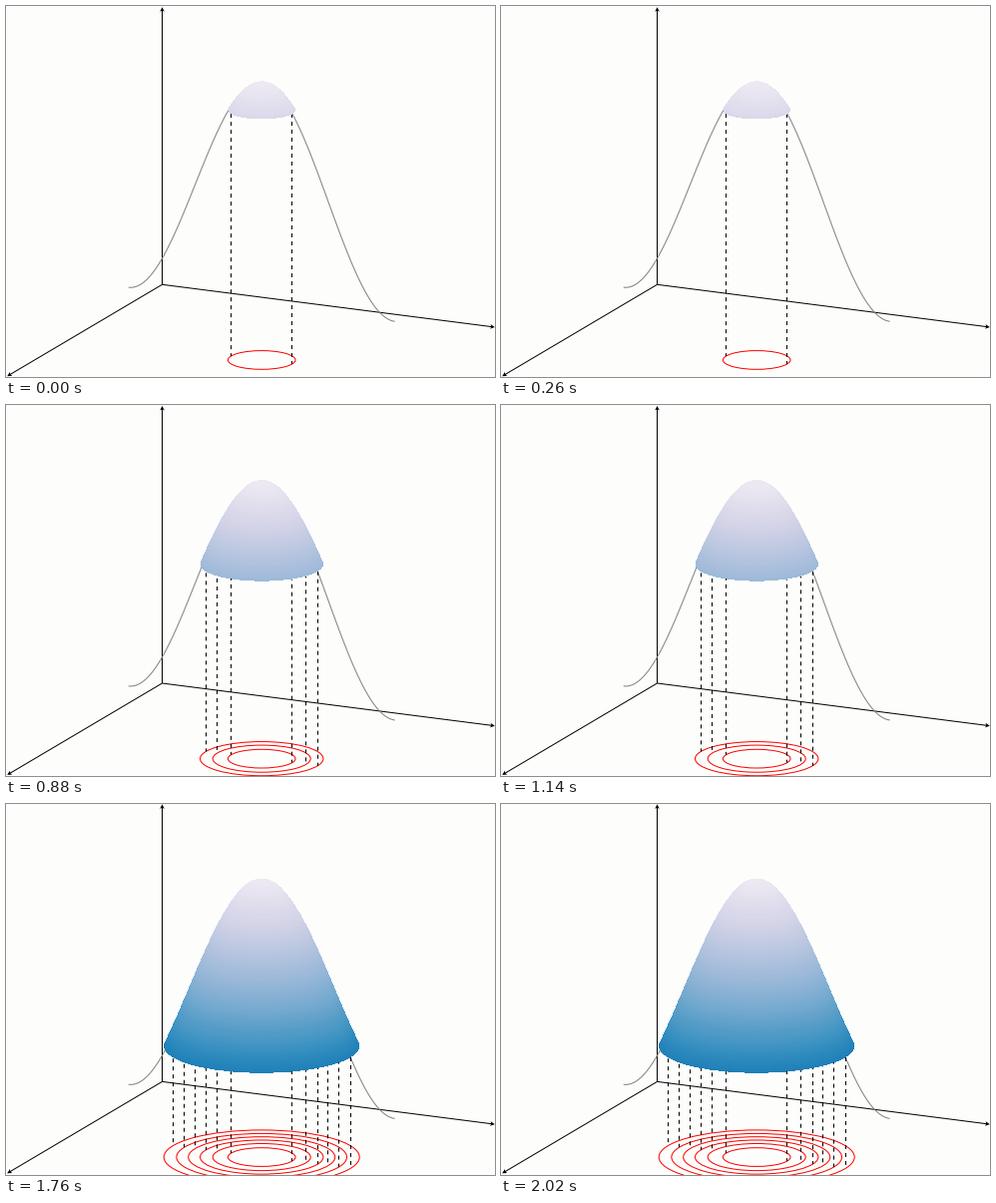
A matplotlib script for the animation above (2.2 s loop, 490 by 372 pixels).

```python
import numpy as np
import matplotlib.pyplot as plt
from matplotlib.animation import FuncAnimation
from matplotlib.patches import Ellipse, Polygon

W, H, DPI = 490, 372, 100
PX = 72 / DPI                      # one pixel in points
BG = "#fdfefc"

CX, BASE, HEIGHT = 256.2, 299.2, 223.0
FLOOR = BASE + HEIGHT / 4
R0 = 147.0                         # radius where the bump reaches zero
TILT = 0.277                       # flattening of horizontal circles
SLOPE = 0.128                      # screen slope of the right-hand axis
STRETCH = np.hypot(1, SLOPE / TILT)

SLICES = (1, 2, 3, 5, 6)           # level reached at each step, in eighths
SHIFT = (0, 0, 0.3, 0.7, 0.9)      # small upward drift of the view

fig = plt.figure(figsize=(W / DPI, H / DPI), dpi=DPI, facecolor=BG)
ax = fig.add_axes([0, 0, 1, 1])
cmap = plt.get_cmap("PuBu")


def radius(z):
    return R0 / np.pi * np.arccos(2 * z - 1)


def height(r):
    return (1 + np.cos(np.pi * r / R0)) / 2


def screen_y(z):
    return BASE - HEIGHT * z


def line(xs, ys, color="black", **kw):
    ax.plot(xs, ys, color=color, lw=PX, snap=False,
            solid_capstyle="butt", **kw)


def arrow(start, tip):
    start, tip = np.array(start), np.array(tip)
    d = (tip - start) / np.linalg.norm(tip - start)
    n = np.array([-d[1], d[0]])
    line(*zip(start, tip - 2 * d), zorder=1)
    back = tip - 4.5 * d
    ax.add_patch(Polygon([tip, back + 2.3 * n, tip - 3.5 * d, back - 2.3 * n],
                         fc="black", lw=0, zorder=1))


def draw_axes():
    origin = (156.5, 279.3)
    for tip in ((156.5, 1.2), (489.8, 322.0), (1.2, 371.2)):
        arrow(origin, tip)


def draw_profile(low):
    """Cross-section of the bump, only below the cap's rim."""
    r = np.linspace(radius(low), R0, 60)
    for u in (-r / STRETCH, r / STRETCH):
        line(CX + u, screen_y(height(r)) + SLOPE * u, "#808080", zorder=2)


def draw_level(z):
    r = radius(z)
    ax.add_patch(Ellipse((CX, FLOOR), 2 * r, 2 * r * TILT, fill=False,
                         ec="red", lw=PX, zorder=3))
    for u in (-r / STRETCH, r / STRETCH):
        x = np.floor(CX + u) + 0.5
        dy = SLOPE * u
        line([x, x], [screen_y(z) + dy, FLOOR + dy], dashes=(4, 4), zorder=4)


def draw_cap(low):
    # hard-edged fills grow by about half a pixel, so shrink them first
    for z in np.linspace(low, 0.9995, 150):
        w = 2 * radius(z)
        ax.add_patch(Ellipse((CX, screen_y(z)), w - 1, max(w * TILT - 1, 0.5),
                             fc=cmap(0.115 + 0.76 * (1 - z)), lw=0,
                             antialiased=False, zorder=5))


def update(i):
    ax.clear()
    ax.axis("off")
    ax.set_xlim(0, W)
    ax.set_ylim(H + SHIFT[i], SHIFT[i])
    low = 1 - SLICES[i] / 8
    draw_axes()
    draw_profile(low)
    for k in range(1, SLICES[i] + 1):
        draw_level(1 - k / 8)
    draw_cap(low)
    return []


anim = FuncAnimation(fig, update, frames=len(SLICES), interval=440,
                     init_func=lambda: [], repeat=True, repeat_delay=0)
plt.show()
```
